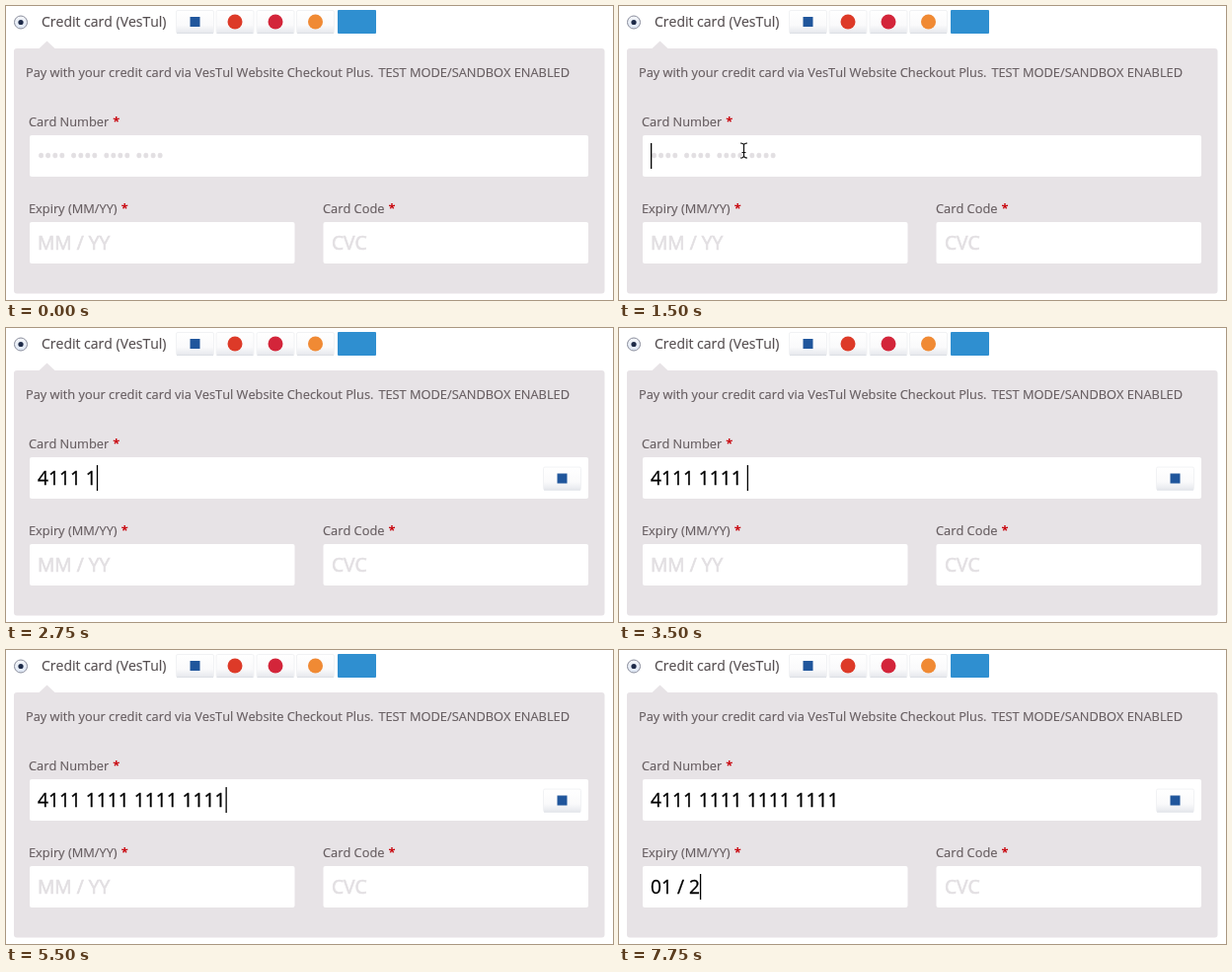
These frames come from a looping animation (615x298 px, 8 s). An HTML page:

```html
<!DOCTYPE html>
<html lang="en">
<head>
<meta charset="utf-8">
<title>Card form</title>
<style>
  html, body { margin: 0; width: 100%; height: 100%; overflow: hidden; background: #fff; }
  svg { display: block; width: 615px; height: 298px; }
  text {
    font: 12.8px "Open Sans", "Noto Sans", sans-serif; font-kerning: none; white-space: pre;
    fill: #665d60; stroke: #665d60; stroke-width: .15px;
  }
  .title { font-size: 14px; fill: #554e50; stroke: #554e50; }
  .value { font-size: 19.2px; fill: #000; stroke: #000; stroke-width: .3px; }
  .hint { font-size: 19.2px; fill: #e2dfe2; stroke: #e2dfe2; stroke-width: .7px; }
  .dots { letter-spacing: -.15px; }
  .req { fill: #c8000a; stroke: none; font-weight: 700; }
  .field { fill: #fff; }
</style>
</head>
<body>
<svg viewBox="0 0 615 298">
  <defs>
    <linearGradient id="paper" x2="0" y2="1">
      <stop offset="0" stop-color="#fff"/>
      <stop offset=".65" stop-color="#fafafb"/>
      <stop offset="1" stop-color="#e6e8ed"/>
    </linearGradient>
    <linearGradient id="knob" x2="0" y2="1">
      <stop offset="0" stop-color="#f4f5f8"/>
      <stop offset="1" stop-color="#dfe8f6"/>
    </linearGradient>
    <g id="card">
      <rect x=".5" y=".5" width="38" height="23" rx="1.5" fill="url(#paper)" stroke="#f1f2f4"/>
      <path d="M1 23.5H38" stroke="#dcdfe5"/>
    </g>
    <g id="blueCard">
      <use href="#card"/>
      <rect x="14.5" y="7" width="10" height="10" fill="#20569c"/>
    </g>
  </defs>

  <circle cx="15" cy="16.5" r="6.5" fill="url(#knob)" stroke="#8a8d9c"/>
  <circle cx="15" cy="16.5" r="2.6" fill="#1d2a48"/>
  <text class="title" x="36" y="21">Credit card (VesTul)</text>

  <use href="#blueCard" x="172" y="4"/>
  <use href="#card" x="212.5" y="4"/>
  <circle cx="232" cy="16" r="7.5" fill="#dd3a28"/>
  <use href="#card" x="253.5" y="4"/>
  <circle cx="273" cy="16" r="7.5" fill="#d3253a"/>
  <use href="#card" x="294" y="4"/>
  <circle cx="313.5" cy="16" r="7.5" fill="#f08a34"/>
  <rect x="336" y="4" width="39" height="24" rx="1" fill="#2f8fd0"/>

  <path d="M33 43.5L41.5 35.5L50 43.5Z" fill="#e7e3e6"/>
  <rect x="8" y="43" width="598.5" height="248.5" rx="3" fill="#e7e3e6"/>
  <text x="20" y="72">Pay with your credit card via VesTul Website Checkout Plus.</text>
  <text x="571" y="72" text-anchor="end">TEST MODE/SANDBOX ENABLED</text>

  <text x="23" y="122">Card Number <tspan class="req" dx=".7">*</tspan></text>
  <text x="23" y="210">Expiry (MM/YY) <tspan class="req" dx=".7">*</tspan></text>
  <text x="321" y="210">Card Code <tspan class="req" dx=".7">*</tspan></text>

  <rect class="field" x="24" y="131" width="566" height="42" rx="2"/>
  <rect class="field" x="24" y="219" width="268.5" height="42" rx="2"/>
  <rect class="field" x="321.5" y="219" width="268.5" height="42" rx="2"/>

  <text class="hint dots" id="numberHint" x="32" y="159">•••• •••• •••• ••••</text>
  <text class="hint" id="expiryHint" x="32" y="247">MM / YY</text>
  <text class="hint" x="330" y="247">CVC</text>
  <text class="value" id="number" x="32" y="159"></text>
  <text class="value" id="expiry" x="32" y="247"></text>
  <use id="brand" href="#blueCard" x="544" y="140.5"/>
  <rect id="caret" width="1.3" height="26"/>

  <path id="arrow" d="M0 0V14L3.3 11L5.6 16L7.9 15L5.7 10.2H10Z" stroke="#fff"/>
  <g id="beam" fill="none">
    <path id="beamLine" d="M-3.5-7.5Q0-7.5 0-5Q0-7.5 3.5-7.5M0-6V6M-3.5 7.5Q0 7.5 0 5Q0 7.5 3.5 7.5M-2 2H2" stroke="#fff" stroke-width="3"/>
    <path d="M-3.5-7.5Q0-7.5 0-5Q0-7.5 3.5-7.5M0-6V6M-3.5 7.5Q0 7.5 0 5Q0 7.5 3.5 7.5M-2 2H2" stroke="#111" stroke-width="1.2"/>
  </g>
</svg>
<script>
const LOOP = 8000, TICK = 250;
const CARD = '4111 1111 1111 1111';
const $ = id => document.getElementById(id);
const show = (id, on) => $(id).setAttribute('visibility', on ? 'visible' : 'hidden');

// [start, shape, x, y]
const pointer = [
  [0, '', 0, 0], [500, 'arrow', 96, 2], [750, 'arrow', 112, 84],
  [1000, 'beam', 126.5, 146.5], [2000, '', 0, 0]
];
const expiry = [[0, ''], [7000, '0'], [7250, '01 / '], [7750, '01 / 2']];
const FOCUS = 1250, TYPE = 2000, PAUSE = 2750, NEXT = 6000;

const at = (steps, t) => steps.filter(s => s[0] <= t).pop();

// One digit per tick, with a doubled digit at PAUSE; a full group adds its space.
function typed(t) {
  if (t < TYPE) return '';
  const n = Math.min(16, (t - TYPE) / TICK + (t < PAUSE ? 1 : 2));
  return CARD.slice(0, n + Math.floor(n / 4));
}

const pen = document.createElement('canvas').getContext('2d');
function width(s) {
  pen.font = '19.2px "Open Sans", "Noto Sans", sans-serif';
  return pen.measureText(s).width;
}

function draw(t) {
  const number = typed(t), date = at(expiry, t)[1];
  const inDate = t >= NEXT;
  $('number').textContent = number;
  $('expiry').textContent = date;
  show('numberHint', !number);
  show('expiryHint', !date);
  show('brand', number);

  show('caret', t >= FOCUS);
  $('caret').setAttribute('x', 32 + width(inDate ? date : number));
  $('caret').setAttribute('y', inDate ? 227 : 139);

  const [, shape, x, y] = at(pointer, t);
  for (const id of ['arrow', 'beam']) {
    show(id, id === shape);
    $(id).setAttribute('transform', `translate(${x} ${y})`);
  }
}

let last = -1;
function loop() {
  const t = Math.floor(performance.now() % LOOP / TICK) * TICK;
  if (t !== last) draw(last = t);
  requestAnimationFrame(loop);
}
loop();
</script>
</body>
</html>
```
